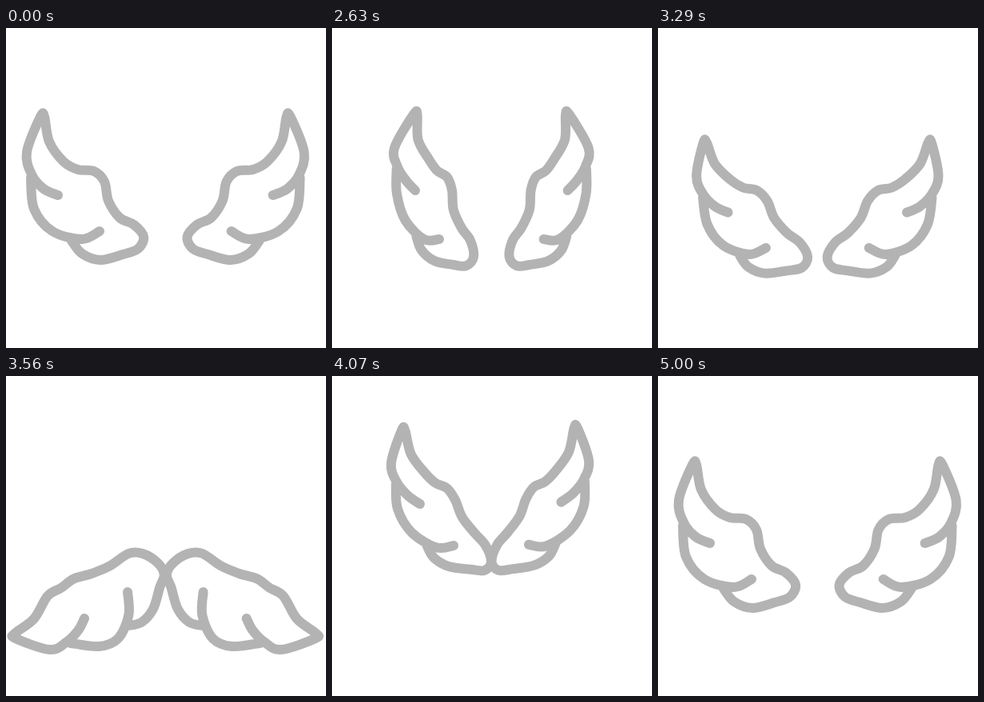
An HTML page with a canvas that plays this animation: 400x400 px, repeating every 5.03 s.

```html
<!DOCTYPE html>
<html lang="en">
<head>
<meta charset="utf-8">
<title>Flapping wings</title>
<style>
html, body { margin: 0; width: 100%; height: 100%; overflow: hidden; background: #fff; }
canvas { display: block; }
</style>
</head>
<body>
<canvas id="stage" width="400" height="400"></canvas>
<script>
const ctx = document.getElementById('stage').getContext('2d');
const LOOP = 5030, HOLD = 2030, STEP = 30, AXIS = 199.3;

const points = text => text.split(' ').map(pair => pair.split(',').map(Number));

// Left wing at rest: the outline from the first feather round to the third, then the middle feather.
const outline = points('65,209 47,201 32,183 26,155 43,111 48,111 54,142 72,167 90,177 110,179 123,192 ' +
  '128,216 142,237 160,246 172,261 165,276 146,283 118,290 95,282 82,266');
const feather = points('117,254 95,264 58,254 35,226 31,187');
const wing = [...outline, ...feather];

// A pose moves ten handles: feather end, outer edge, tip, leading edge, notch, below it,
// root, underside, middle feather end, its outer edge. The rest of the wing bends along.
const rest = [0, 3, 4, 7, 10, 12, 14, 17, 20, 23].map(i => wing[i]);
const up = points('104,203 78,150 102,108 121,164 150,203 162,250 177,286 128,291 134,264 81,207');
const flat = points('88,293 36,307 2,279 60,249 119,250 169,264 197,290 151,332 140,296 91,331');
const down = points('98,303 55,342 12,328 52,275 107,247 153,222 190,234 184,291 152,270 116,338');
const high = points('110,160 74,109 87,68 116,121 154,155 178,196 199,232 146,238 152,212 82,166');

// Gauss-Jordan elimination with row swaps.
function solve(matrix, right) {
  const rows = matrix.map((row, i) => [...row, right[i]]), n = rows.length;
  for (let c = 0; c < n; c++) {
    let best = c;
    for (let r = c + 1; r < n; r++) if (Math.abs(rows[r][c]) > Math.abs(rows[best][c])) best = r;
    [rows[c], rows[best]] = [rows[best], rows[c]];
    for (let r = 0; r < n; r++) {
      if (r === c) continue;
      const f = rows[r][c] / rows[c][c];
      for (let k = c; k <= n; k++) rows[r][k] -= f * rows[c][k];
    }
  }
  return rows.map((row, i) => row[n] / row[i]);
}

// Thin-plate warp: how much each handle pulls on each point of the wing.
const kernel = (a, b) => {
  const r = Math.hypot(a[0] - b[0], a[1] - b[1]) / 100;
  return r ? r * r * Math.log(r) : 0;
};
const basis = p => [...rest.map(h => kernel(p, h)), 1, p[0] / 100, p[1] / 100];
const system = rest.map(basis);
for (let k = rest.length; k < rest.length + 3; k++) {
  system.push([...rest.map((h, i) => system[i][k]), 0, 0, 0]);
}
const pulls = wing.map(p => solve(system, basis(p)).slice(0, rest.length));
const bend = pose => pulls.map(pull => [0, 1].map(
  axis => pull.reduce((sum, w, i) => sum + w * pose[i][axis], 0)));

const shift = (pose, dx, dy) => pose.map(([x, y]) => [x + dx, y + dy]);
const mix = (a, b, k) => a.map((p, i) => p.map((v, j) => v + (b[i][j] - v) * k));

const keys = [
  [0, rest],
  [2010, rest],
  [2410, shift(mix(rest, up, .9), 0, -18)],
  [2630, up],
  [2740, shift(flat, 0, 6)],
  [2850, shift(down, 0, 36)],
  [3020, flat],
  [3260, mix(shift(rest, 0, 20), shift(high, 0, 62), .5)],
  [3390, shift(flat, 0, -15)],
  [3490, shift(down, 0, 12)],
  [3560, down],
  [3740, shift(flat, 0, -40)],
  [4070, high],
  [4170, shift(high, -1, -7)],
  [4700, shift(rest, 4, -14)],
  [5000, rest],
  [LOOP, rest]
];

// Slope of one coordinate at key k; zero at turning points so that nothing overshoots.
function slope(k, i, j) {
  if (!k || k === keys.length - 1) return 0;
  const [[t0, a], [t1, b], [t2, c]] = keys.slice(k - 1, k + 2);
  const before = (b[i][j] - a[i][j]) / (t1 - t0), after = (c[i][j] - b[i][j]) / (t2 - t1);
  return before * after > 0 ? 2 * before * after / (before + after) : 0;
}

function poseAt(t) {
  let k = 0;
  while (k < keys.length - 2 && t >= keys[k + 1][0]) k++;
  const [t0, a] = keys[k], [t1, b] = keys[k + 1];
  const d = t1 - t0, u = (t - t0) / d, v = 1 - u;
  return a.map((p, i) => p.map((x, j) => v * v * (1 + 2 * u) * x + u * u * (3 - 2 * u) * b[i][j]
    + d * u * v * (v * slope(k, i, j) - u * slope(k + 1, i, j))));
}

// Smooth curve through all points.
function trace(pts) {
  ctx.moveTo(...pts[0]);
  for (let i = 0; i < pts.length - 1; i++) {
    const a = pts[i], b = pts[i + 1], p = pts[i - 1] || a, q = pts[i + 2] || b;
    ctx.bezierCurveTo(a[0] + (b[0] - p[0]) / 6, a[1] + (b[1] - p[1]) / 6,
      b[0] - (q[0] - a[0]) / 6, b[1] - (q[1] - a[1]) / 6, ...b);
  }
}

function drawWing(shape) {
  ctx.beginPath();
  trace(shape.slice(0, outline.length));
  trace(shape.slice(outline.length));
  ctx.stroke();
}

function draw(now) {
  let t = now % LOOP;
  t = t < HOLD ? 0 : HOLD + Math.floor((t - HOLD) / STEP) * STEP;
  const shape = bend(poseAt(t));
  ctx.fillStyle = '#fff';
  ctx.fillRect(0, 0, 400, 400);
  ctx.strokeStyle = '#b3b3b3';
  ctx.lineWidth = 12;
  ctx.lineCap = ctx.lineJoin = 'round';
  drawWing(shape);

  // The right wing mirrors the left and leans in slightly at the top of the last beat.
  ctx.save();
  ctx.translate(2 * AXIS, 0);
  ctx.scale(-1, 1);
  ctx.translate(195, 235);
  ctx.rotate(.028 * Math.max(0, 1 - Math.abs(t - 4070) / 300));
  ctx.translate(-195, -235);
  drawWing(shape);
  ctx.restore();
}

const start = performance.now();
function tick() {
  draw(performance.now() - start);
  requestAnimationFrame(tick);
}
tick();
</script>
</body>
</html>
```
